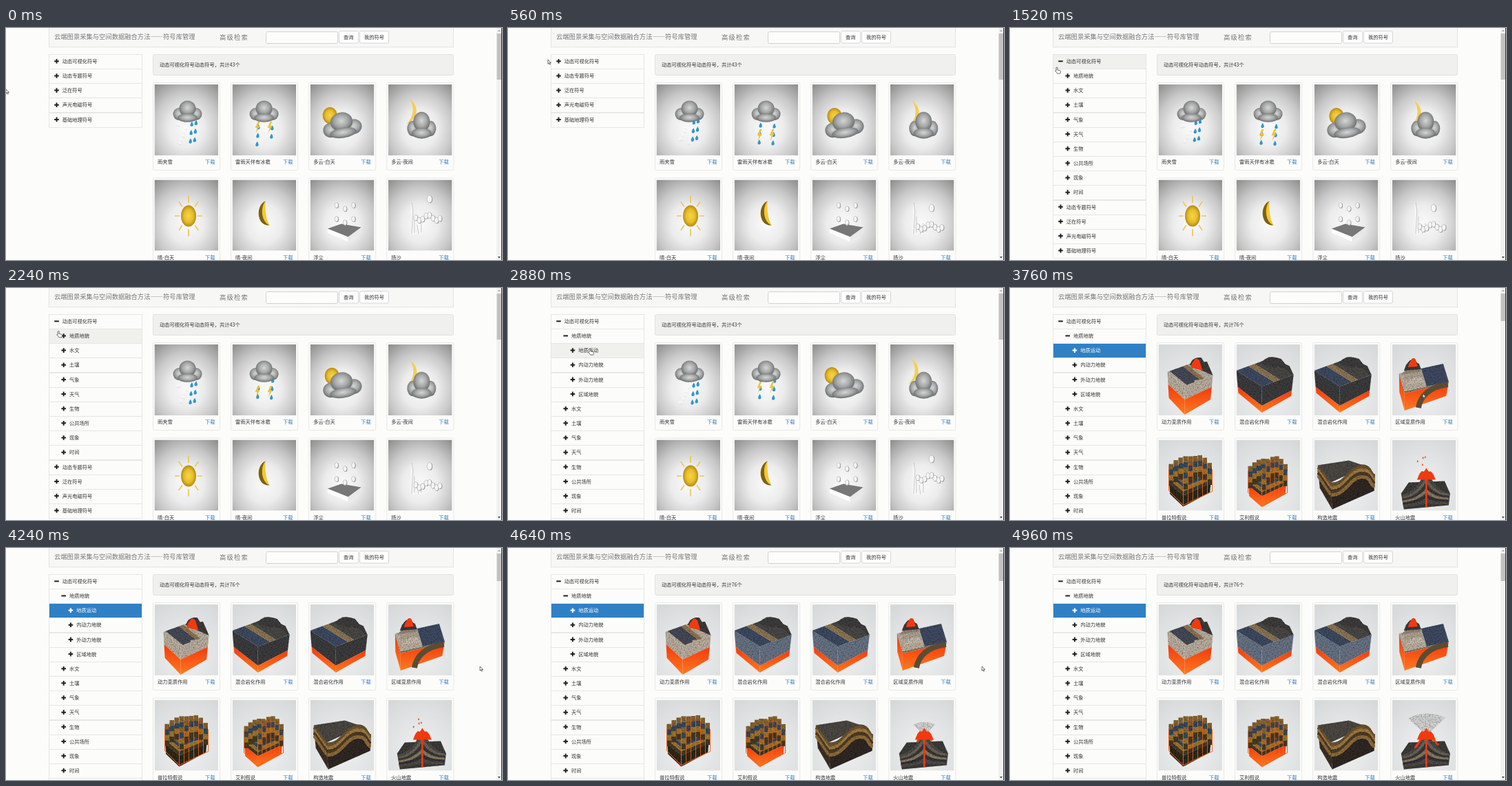
An HTML page for the animation above (5.04 s loop, 720 by 337 pixels).

```html
<!DOCTYPE html>
<html lang="zh">
<head>
<meta charset="utf-8">
<style>
html, body { margin: 0; width: 100%; height: 100%; overflow: hidden; background: #fcfcfa; }
svg { display: block; }
text { font-family: "Noto Sans CJK SC", "Noto Sans CJK", sans-serif; white-space: pre; }
</style>
</head>
<body>
<svg width="720" height="337" viewBox="0 0 720 337">
  <defs>
    <pattern id="hatch" width="3" height="3" patternUnits="userSpaceOnUse">
      <rect width="3" height="3" fill="#f9f9f8"/><path d="M0 3L3 0" stroke="#f0f0ef" stroke-width=".7"/>
    </pattern>
    <radialGradient id="sky" cx=".5" cy=".62" r=".78">
      <stop stop-color="#fafafa"/><stop offset=".35" stop-color="#ececec"/>
      <stop offset=".65" stop-color="#c8c8c8"/><stop offset="1" stop-color="#8e8e8e"/>
    </radialGradient>
    <radialGradient id="studio" cy=".7" r=".8">
      <stop stop-color="#f0f1f1"/><stop offset="1" stop-color="#d6d9da"/>
    </radialGradient>
    <radialGradient id="puff" cy=".45" r=".56">
      <stop stop-color="#d4d6d5"/><stop offset=".55" stop-color="#a5a7a7"/><stop offset="1" stop-color="#666969"/>
    </radialGradient>
    <radialGradient id="gold">
      <stop stop-color="#f8d545"/><stop offset=".6" stop-color="#e6bd2c"/><stop offset="1" stop-color="#b78a12"/>
    </radialGradient>
    <linearGradient id="lava" x2="0" y2="1"><stop stop-color="#f23a0c"/><stop offset="1" stop-color="#ff7a20"/></linearGradient>
    <filter id="rock" x="0" y="0" width="1" height="1">
      <feTurbulence type="fractalNoise" baseFrequency=".5" numOctaves="2"/>
      <feColorMatrix values="0 0 0 0 0  0 0 0 0 0  0 0 0 0 0  1.3 0 0 0 -.5"/>
      <feComposite operator="in" in2="SourceGraphic" result="grain"/>
      <feMerge><feMergeNode in="SourceGraphic"/><feMergeNode in="grain"/></feMerge>
    </filter>
  </defs>
  <g id="stage"></g>
</svg>
<script>
const LOOP = 5040, TICK = 80, CYCLE = 960, ROW = 21.15;
const OPEN_1 = 1280, OPEN_2 = 2320, SELECT = 3280, LOADED = 3680, LEAVE = 4720;

// moves of the pointer: start time, end time, x, y reached
const START = [0, 89];
const MOVES = [[240, 560, 58, 46], [800, 1200, 67, 57], [2160, 2560, 108, 85], [2720, 2880, 118, 88],
  [3200, 3440, 188, 104], [3440, 3840, 702, 166], [4000, 4160, 688, 172]];

const ROOTS = ['动态可视化符号', '动态专题符号', '泛在符号', '声光电磁符号', '基础地理符号'];
const TOPICS = ['地质地貌', '水文', '土壤', '气象', '天气', '生物', '公共场所', '现象', '时间'];
const FORMS = ['地质运动', '内动力地貌', '外动力地貌', '区域地貌'];
const WEATHER = ['雨夹雪', '雷雨天伴有冰雹', '多云-白天', '多云-夜间', '晴-白天', '晴-夜间', '浮尘', '扬沙'];
const GEOLOGY = ['动力变质作用', '混合岩化作用', '混合岩化作用', '区域变质作用', '普拉特假说', '艾利假说', '构造地震', '火山地震'];

const rect = (x, y, w, h, fill, stroke = 'none', r = 0) =>
  `<rect x="${x}" y="${y}" width="${w}" height="${h}" rx="${r}" fill="${fill}" stroke="${stroke}"/>`;
const text = (x, y, s, fill = '#333', size = 7.25, gap = 0) =>
  `<text x="${x}" y="${y}" fill="${fill}" font-size="${size}" letter-spacing="${gap}">${s}</text>`;
const path = (d, fill) => `<path d="${d}" fill="${fill}"/>`;
const poly = (fill, ...points) => path(`M${points}z`, fill);
const line = (d, stroke, width = 1) => `<path d="${d}" fill="none" stroke="${stroke}" stroke-width="${width}"/>`;
const oval = (x, y, rx, ry, fill, stroke = 'none') =>
  `<ellipse cx="${x}" cy="${y}" rx="${rx}" ry="${ry}" fill="${fill}" stroke="${stroke}" stroke-width=".6"/>`;
const group = (attrs, body) => `<g ${attrs}>${body}</g>`;
const repeat = (n, draw) => Array.from({ length: n }, (_, k) => draw(k)).join('');
const clamp = v => Math.max(0, Math.min(1, v));
const mix = (a, b, k) => a.map((v, i) => v + (b[i] - v) * k);
const noise = n => Math.abs(Math.sin(n * 127.1) * 43758.5) % 1;
const swing = t => (1 - Math.cos(t / CYCLE * 2 * Math.PI)) / 2;

const pointerAt = t => MOVES.reduce((at, [from, to, x, y]) =>
  mix(at, [x, y], clamp((t - from) / (to - from))), START);

// ---- weather pictures, 92 by 103 each ----
const cloud = transform => group(`transform="${transform}"`,
  oval(-12.5, 4, 8.5, 9, 'url(#puff)') + oval(12.5, 4, 8.5, 9, 'url(#puff)')
  + oval(0, -4, 12, 11.5, 'url(#puff)') + oval(0, 9.5, 14.5, 6.2, 'url(#puff)'));

const drop = (x, y) => path(`M${x + .6} ${y - 4.5}q3 5 1.4 6.6q-2 1.5-3.6 0q-1.1-2 2.2-6.6z`, '#3297c8');

const rain = (x, t) => repeat(4, k => {
  const y = 44 + 12.3 * ((k + t / 315) % 4);
  return y > 52 && y < 88 ? drop(x - (y - 56) * .08, y) : '';
});

const flake = (x, y) => line(`M${x - 2} ${y - 2}l4 4m0-4l-4 4m2-5v6`, '#f8f8f8', .9) + line(`M${x - 2} ${y + 2}l4 1`, '#bbb', .4);

const sleet = t => repeat(6, k => flake(34 + k * 37 % 14, 58 + (k * 11 + t / 26) % 28))
  + rain(54, t + 50) + rain(60, t) + cloud('translate(48 39)');

function thunder(t) {
  const y = 54 + t % CYCLE / CYCLE * 19;
  const bolt = x => path(`M${x} ${y}l-4 9h3l-2 8l6-11h-3l3-6z`, '#efc23a');
  return line('M42 57l2 26m3-28l-2 25', '#f4f4f4', 1.2) + rain(38, t + 160) + rain(58, t + 190)
    + bolt(37) + bolt(55) + cloud('translate(46 39)');
}

const cloudyDay = t => oval(28.5 + 4 * swing(t), 45 + swing(t), 10.5, 12, 'url(#gold)')
  + cloud('translate(46 59) rotate(-9) scale(1.35 1.2)');

const cloudyNight = t => group(`transform="translate(${swing(t)} ${3 * swing(t)})"`,
    path('M31 21C45 30 45 50 26 58C37 48 39 34 31 21z', '#f4cf55')) + cloud('translate(48.5 59) scale(1 1.25)');

const sunny = () => repeat(8, k => {
  const c = Math.cos(k * Math.PI / 4), s = Math.sin(k * Math.PI / 4);
  return line(`M${49.5 + 13 * c} ${52.5 + 19 * s}L${49.5 + 20 * c} ${52.5 + 29.5 * s}`, '#efc65a', 1.7);
}) + oval(49.5, 52.5, 11, 15.5, 'url(#gold)');

const clearNight = () => path('M48 31C35 36 34 63 50 66L54 66C45 56 44 42 48 31z', '#7d6010')
  + path('M48 31C40 40 42 62 54 66C49 58 47 44 48 31z', '#f0c935');

const ball = (x, y, r = 2.6) => oval(x + .8, y + .4, r, r * 1.5, '#888') + oval(x, y, r, r * 1.5, '#f5f5f5', '#aaa');

const dust = () => path('M25 71L45 64L74 69L55 83z', '#777') + path('M25 71L55 83v7L25 77z', '#fcfcfc')
  + path('M55 83L74 69v7L55 90z', '#e8e8e8')
  + repeat(6, k => ball(38 + k % 3 * 12.3, 37 + (k > 2 ? 20 : 0) + (k % 3 === 1 ? 5 : 0)));

const sand = t => path('M33 32l3 10l1 32l19 4l-24 2z', '#f6f6f6') + line('M34 33l2 12l-2 34m4-26v24m4-12l2 14m4-16v14', '#aaa', .6)
  + ball(60, 28 + 14 * swing(t), 3.6)
  + repeat(8, k => ball(40 + 5 * k, 55 + 4 * Math.sin(k * 1.3) + 14 * swing(t), 2.8));

const weatherIcons = [sleet, thunder, cloudyDay, cloudyNight, sunny, clearNight, dust, sand];

// ---- geology pictures ----
const LAVA = 'url(#lava)', RED = '#f03a10', SEA = '#3f4c62', TAN = '#8d7652', BEIGE = '#b9ae9f', DARK = '#403e3c';
const rock = body => group('filter="url(#rock)"', body);

// a block seen from above: three top corners, then layers of [colour, depth] in perspective
function block(left, front, right, layers) {
  const on = (u, v) => front.map((f, i) => f + u * (right[i] - f) + v * (left[i] - f));
  const down = ([x, y], h) => [x + (front[0] - x) * h * .002, y + h * (1 - Math.abs(x - front[0]) * .004)];
  let sides = '', h = 0;
  for (const [fill, depth] of layers) {
    const faces = [left, right].map(side =>
      poly(fill, down(side, h), down(front, h), down(front, h + depth), down(side, h + depth))).join('');
    sides += fill === LAVA ? faces : rock(faces);
    h += depth;
  }
  const strip = (from, to, fill) => rock(poly(fill, on(from, 0), on(to, 0), on(to, 1), on(from, 1)));
  return { on, sides, strip };
}

// jagged hill standing on the line between two points
function ridge(a, b, height, fill, seed = 1) {
  const crest = Array.from({ length: 9 }, (_, k) => {
    const [x, y] = mix(a, b, k / 8);
    return [x, y - height * (.65 + .35 * noise(seed + k)) * Math.sin(Math.PI * k / 8) ** .6];
  });
  return poly(fill, ...crest);
}
const hill = (...args) => rock(ridge(...args));

function dynamic() {
  const { on, sides, strip } = block([13, 40], [38, 60], [79, 45], [[BEIGE, 20], [LAVA, 22]]);
  return sides + strip(0, 1, BEIGE) + strip(.08, .55, '#474c58') + strip(.55, .7, TAN)
    + hill(on(.4, .1), on(.62, 0), -22, BEIGE) + hill(on(.75, .95), on(1, 0), 20, DARK, 4)
    + ridge(on(.7, .8), on(.9, .45), 18, RED, 2);
}

function migmatite(t) {
  const side = mix([62, 62, 65], [104, 115, 132], clamp((t - 4240) / 400));
  const { on, sides, strip } = block([0, 38], [37, 61], [83, 44], [[`rgb(${side})`, 28], [LAVA, 10]]);
  return sides + strip(0, .38, SEA) + strip(.38, .58, TAN) + strip(.58, 1, '#4a4946')
    + hill(on(.72, .95), on(1, 0), 19, DARK, 3) + hill(on(.65, .5), on(.95, 0), 10, '#4b4a47', 7);
}

function regional() {
  const { on, sides, strip } = block([10, 42], [18, 68], [82, 54], [['#8a7a64', 3], [LAVA, 25]]);
  return sides + line('M38 92C41 74 56 61 81 58', '#5d4b32', 8) + strip(0, .5, BEIGE) + strip(.5, 1, SEA)
    + repeat(3, k => hill(on(.05, .9 - k * .3), on(.5, .85 - k * .3), 11, ['#938878', '#aca08f', '#c4b9a8'][k], k))
    + hill([17, 38], [42, 36], 17, DARK, 5) + ridge([23, 33], [37, 32], 15, RED, 2);
}

// layered columns that rise towards the middle of a block, inside an orange frame
function isostasy(left, front, right, deep) {
  const strata = ['#8a6530', '#3b4a5a', '#a1742f', '#4a3b26'];
  const { on, sides, strip } = block(left, front, right, [...strata.map(c => [c, 6]), deep]);
  const columns = v => repeat(6, i => {
    const [x, y] = on(i / 6, v), rise = 29 * Math.sin(Math.PI * (.2 + i / 7.5)) * (1 - .6 * v);
    return repeat(4, k => rect(x, y - rise + k * 8, 6.5, 8, strata[k]));
  });
  const wires = repeat(7, i => {
    const [x, y] = on(i / 6, 0);
    return line(`M${x} ${y - 24 * Math.sin(Math.PI * (.2 + i / 7.5))}V${y + 38 - i}`, '#f0661c', .8);
  });
  return sides + strip(0, 1, '#5b4a30') + rock(columns(1) + columns(0)) + wires
    + line(`M${left}v32L${front[0]} ${front[1] + 38}L${right[0]} ${right[1] + 32}V${right[1]}`, '#f0661c');
}
const pratt = () => isostasy([15, 42], [36, 57], [78, 43], ['#33291d', 16]);
const airy = () => isostasy([17, 45], [37, 58], [74, 45], [LAVA, 16]);

function quake() {
  const fold = d => `M24 ${62 + d}C44 ${64 + d} 52 ${37 + d} 68 ${36 + d}S80 ${48 + d} 88 ${50 + d}`;
  const bands = ['#6d5432', '#a07a42', '#4d3e2a', '#8f6d3b'];
  return rock(path('M5 37L50 30L68 36L50 50L24 62z', '#4d4a44') + path('M5 37L24 62L26 101L8 70z', '#3d3326')
    + path(fold(0) + 'L87 74L26 101z', '#332b25')
    + bands.map((c, k) => line(fold(3 + k * 5), c, 5) + line(`M5 ${40 + k * 4}L24 ${65 + k * 5}`, c, 4)).join(''));
}

function volcano(t) {
  const grow = clamp((t - 4320) / 560), bands = ['#6a655c', '#3b3a39', '#8a7a62', '#34343a', '#4f4b46'];
  const plume = path(`M48 50L${48 - 25 * grow} ${49 - 22 * grow}Q49 ${49 - 36 * grow} ${50 + 27 * grow} ${49 - 23 * grow}L52 50z`, '#d2d2d1');
  const sparks = repeat(4, k => oval(48 - noise(k) * 14, 40 - (k * 5 + t / 60) % 16, .8, 1.6, RED));
  return (grow ? rock(plume) : sparks)
    + rock(path('M13 78L24 62L76 60L84 78L82 95L17 101z', '#3e3d3b') + path('M14 80Q38 74 46 47H53Q61 72 83 78L82 90L16 96z', '#514c46')
      + bands.map((c, k) => line(`M16 ${84 + k * 3}Q36 ${82 + k * 3} 49 ${58 + k * 8}Q62 ${80 + k * 3} 82 ${80 + k * 3}`, c, 4)).join(''))
    + ridge([36, 58], [63, 58], 17, RED, 6) + line('M49.5 47V98', RED, 2.6)
    + (grow ? line(`M47 50l${-14 * grow} ${20 * grow}M53 50l${14 * grow} ${16 * grow}`, RED, 3) : '');
}

const geologyIcons = [dynamic, migmatite, migmatite, regional, pratt, airy, quake, volcano];

// ---- page parts ----
const button = (x, w, label) => rect(x, 4.5, w, 17.5, '#fefefe', '#d6d6d6', 2) + text(x + 6.5, 15.8, label);

const header = () => rect(62.5, -2, 587, 29.8, 'url(#hatch)', '#e4e4e3')
  + text(70, 16.4, '云端图景采集与空间数据融合方法——符号库管理', '#777', 9.3)
  + text(310, 16.5, '高级检索', '#777', 9.3, 1.2)
  + rect(377.5, 5.5, 104, 17, '#fdfdfc', '#d2d2d2', 2) + button(483.5, 28, '查询') + button(513.5, 42, '我的符号');

function menu(t, [px, py]) {
  const rows = ROOTS.map(name => [name, 0]);
  if (t >= OPEN_1) rows.splice(1, 0, ...TOPICS.map(name => [name, 1]));
  if (t >= OPEN_2) rows.splice(2, 0, ...FORMS.map(name => [name, 2]));
  const hover = t < SELECT && px > 62 && px < 198 ? Math.floor((py - 38) / ROW) : -1;
  return rows.map(([name, level], i) => {
    const y = Math.round(38 + i * ROW) + .5, x = 73.5 + level * 10.2, mid = 48.3 + i * ROW;
    const chosen = t >= SELECT && i === 2;
    const open = i === 0 && t >= OPEN_1 || i === 1 && t >= OPEN_2;
    return rect(62.5, y, 135, ROW, chosen ? '#2f80c4' : i === hover ? '#f0f0ed' : '#fcfcfa', '#e6e6e4')
      + line(`M${x - 3.3} ${mid}h6.6` + (open ? '' : `M${x} ${mid - 3.3}v6.6`), chosen ? '#fff' : '#222', 2)
      + text(x + 8.3, mid + 2.7, name, chosen ? '#fff' : '#333');
  }).join('');
}

function cards(t) {
  const later = t >= SELECT, names = later ? GEOLOGY : WEATHER, icons = later ? geologyIcons : weatherIcons;
  return names.map((name, i) => {
    const x = 213.5 + i % 4 * 113.1, y = 79.5 + (i >> 2) * 138.5;
    const picture = later && t < LOADED ? '' :
      `<svg x="${x + 2}" y="${y + 2.5}" width="92.5" height="103">${rect(0, 0, 93, 103, later ? 'url(#studio)' : 'url(#sky)')}${icons[i](t)}</svg>`;
    return rect(x, y, 97, 127, '#fcfcfb', '#e8e8e7', 2) + picture
      + text(x + 6.5, y + 117.6, name) + text(x + 75.5, y + 117.6, '下载', '#337ab7');
  }).join('');
}

const scrollbar = t => rect(712, 0, 8, 337, '#f1f1f1') + rect(712.5, 8, 6.5, t < SELECT ? 67 : 40, '#c1c1c1')
  + path('M713.8 5h4l-2-2.5z', '#aaa') + path('M713.8 332h4l-2 2.5z', '#444') + rect(719, 0, 1, 337, '#333');

function pointer(t, [x, y]) {
  if (t >= LEAVE) return '';
  const hand = x > 62 && x < 198;
  const shape = hand ? 'M1 0q1 0 1 1v3l3.6.8q1 .3.8 1.5l-.6 2.9h-4l-3.2-4q.4-1 1.4 0v-4.2q0-1 1-1z'
    : 'M0 0v6.2l1.4-1.3 1 2.2 1-.4-1-2.2h2z';
  return `<path transform="translate(${x} ${y})" d="${shape}" fill="#fff" stroke="#333" stroke-width=".7"/>`;
}

function render(t) {
  const tip = pointerAt(t);
  document.getElementById('stage').innerHTML = header() + menu(t, tip)
    + rect(213.5, 38.5, 436, 30, '#f0f0ef', '#e2e2e1', 2)
    + text(223, 56, `动态可视化符号动态符号，共计${t < SELECT ? 43 : 76}个`)
    + cards(t) + scrollbar(t) + pointer(t, tip);
}

let shown = -1;
function play() {
  let tick = Math.floor(performance.now() % LOOP / TICK);
  if (tick % 6 === (tick < 21 ? 2 : 3)) tick--; // the picture rests for one tick in six
  if (tick !== shown) render((shown = tick) * TICK);
  requestAnimationFrame(play);
}
play();
</script>
</body>
</html>
```
